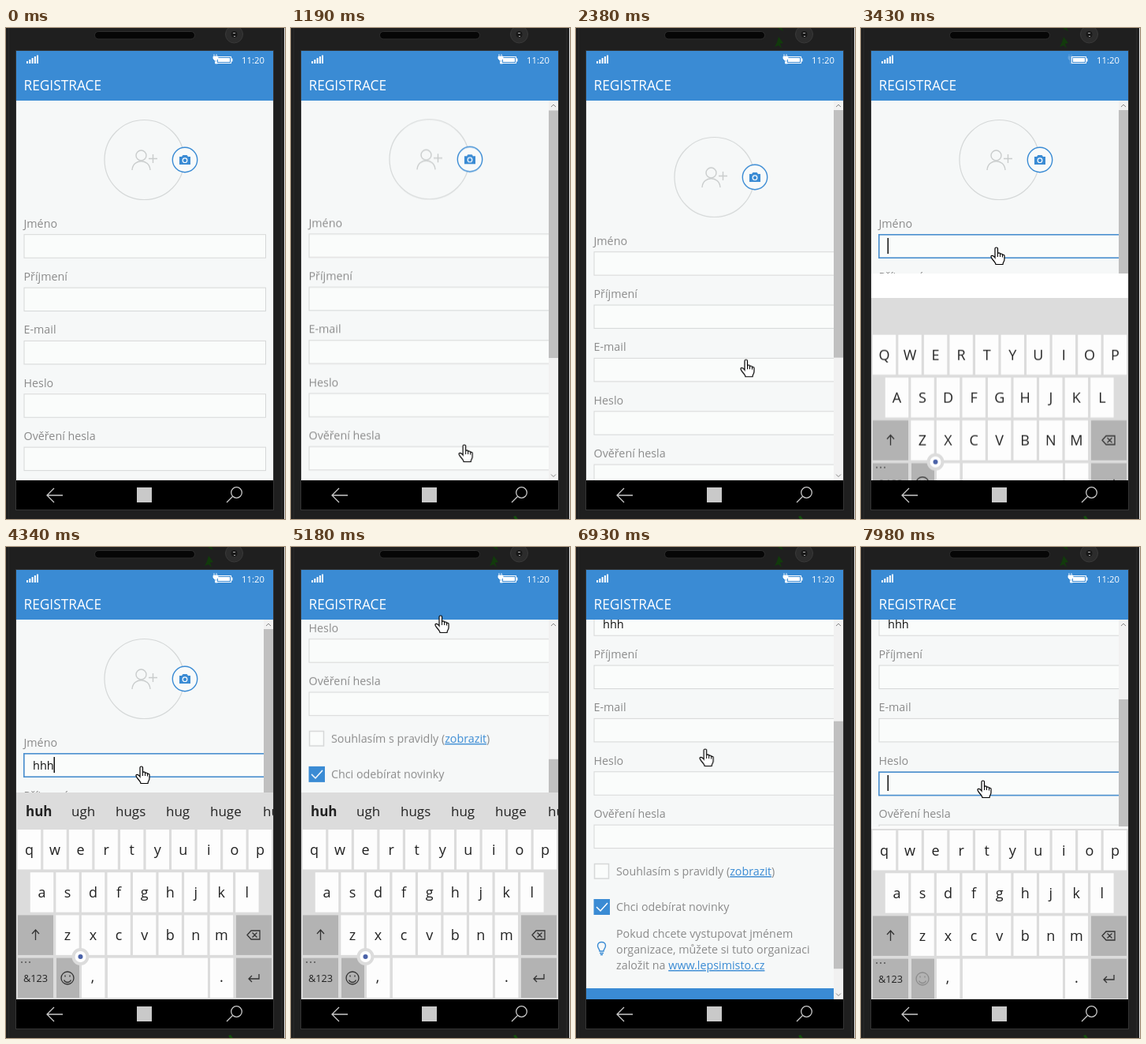
An HTML page that plays this animation: 354 by 622 pixels, repeating every 8 s.

```html
<!DOCTYPE html>
<html lang="cs">
<head>
<meta charset="utf-8">
<title>Registrace</title>
<style>
html, body { margin: 0; width: 100%; height: 100%; overflow: hidden; background: #1e1e1e; }
svg { position: absolute; left: 0; top: 0; display: block; }
text { font-family: "Open Sans", "Noto Sans", sans-serif; }
.stage { position: absolute; left: 0; top: 0; width: 354px; height: 622px; overflow: hidden; }
.view, .keyboard { position: absolute; left: 13px; width: 326px; overflow: hidden; }
.view { top: 92px; height: 481px; background: #f6f8f8; }
.keyboard { top: 311px; height: 262px; background: #fff; }
.page text { font-size: 14.3px; fill: #8b8b8b; }
.page .typed { font-size: 14.5px; fill: #111; }
.page .link { fill: #3a8bd4; text-decoration: underline; }
.field { fill: #fafcfb; stroke: #d6d8d8; }
.focus { fill: none; stroke: #4a90d0; stroke-width: 1.6; }
.line { fill: none; stroke: #3a8bd4; stroke-width: 1.4; }
.faint { fill: none; stroke: #d5d8d8; stroke-width: 1.2; }
.glyph { fill: none; stroke: #333; stroke-width: 1.3; }
.key { font-size: 18px; fill: #222; text-anchor: middle; }
.word { font-size: 17px; fill: #222; }
</style>
</head>
<body>
<div class="stage">
  <svg width="354" height="622">
    <rect width="354" height="622" fill="#1f1f1f"/>
    <path d="M3.5 0V622M349.5 0V622" stroke="#292929"/>
    <path d="M353.5 0V622" stroke="#e8e8e8"/>
    <rect x="112.5" y="4.5" width="127" height="9.5" rx="4.7" fill="#060606" stroke="#2e2e2e"/>
    <circle cx="289.500" cy="8" r="11" fill="#2c2c2c" stroke="#393939"/>
    <circle cx="289.500" cy="8" r="4" fill="#191919"/>
    <path d="M288 6.500h3M289 10.500h2" stroke="#aaa"/>
    <rect x="12.500" y="28.500" width="327" height="582" fill="#000" stroke="#343434"/>
    <rect x="13" y="29" width="326" height="63" fill="#3a8bd4"/>
    <path d="M27 45v-3M30.300 45v-5M33.600 45v-7M36.900 45v-9M40 45v-10.500" stroke="#fff" stroke-width="2"/>
    <rect x="267.500" y="36.500" width="18" height="8" fill="none" stroke="#fff"/>
    <path d="M269 38h15v5h-15zM286 38.500h1.500v4H286z" fill="#fff"/>
    <path class="plug" d="M264 33v3M267 33v3M263 36h6v3l-2 2h-2l-2-2zM265.500 41v4h3" fill="#fff" stroke="#fff" stroke-width=".8"/>
    <text x="299" y="44.500" font-size="11.300" fill="#fff">11:20</text>
    <text x="22.500" y="79" font-size="17.300" fill="#fff">REGISTRACE</text>
    <g fill="none" stroke="#c9c9c9" stroke-width="1.300">
      <path d="M72 592H53M61 583l-9 9 9 9"/>
      <circle cx="292.500" cy="588.500" r="6.800"/><path d="M287.500 593.500L280 601"/>
    </g>
    <rect x="166" y="582" width="19" height="19" fill="#c9c9c9"/>
    <path class="smudge" d="M282 619l3-1 3 4h-4z" fill="#14500c"/>
    <path class="residue" d="M256 0h5l2 4-4-2zM257 11l6 8-4 1 2 6-4-4-5 2 3-6z" fill="#123a0c"/>
    <path class="spark" d="M252 0h3M258 0l5 2M261 3h2" stroke="#20e020" stroke-width="1.500"/>
  </svg>

  <div class="view">
    <svg class="page" width="326" height="701" viewBox="13 92 326 701">
      <circle class="faint" cx="175.500" cy="167" r="50.500"/>
      <g class="faint" style="stroke:#c9cccc;stroke-width:1.400">
        <circle cx="171.500" cy="161.500" r="6.500"/><path d="M160 180c1-15 22-15 23 0M181 165.500h11M186.500 160v11"/>
      </g>
      <circle cx="227" cy="167" r="15.700" fill="#f8fafa" class="line" style="fill:#f8fafa"/>
      <path d="M220 163h3l1.500-2h5l1.500 2h3v10h-14z" fill="#3a8bd4"/>
      <circle cx="227" cy="167.700" r="2.800" fill="#3a8bd4" stroke="#fff" stroke-width="1.200"/>
      <g id="fields"></g>
      <g class="focusName">
        <rect class="focus" x="22.800" y="261.800" width="307" height="29.400"/>
        <rect class="caret" x="33.500" y="266" width="1.500" height="20" fill="#111"/>
      </g>
      <text class="typed" x="34" y="282"><tspan class="h1">h</tspan><tspan class="h2">h</tspan><tspan class="h3">h</tspan></text>
      <g class="focusPass">
        <rect class="focus" x="22.800" y="464.200" width="307" height="29.400"/>
        <rect x="33.500" y="468" width="1.500" height="20" fill="#111"/>
      </g>
      <rect class="field" x="23.500" y="580.500" width="18" height="18.500" style="stroke-width:1.500"/>
      <text x="51" y="595">Souhlasím s pravidly (<tspan class="link">zobrazit</tspan>)</text>
      <rect x="22.500" y="625" width="20.500" height="20" fill="#3a8bd4"/>
      <path d="M26 635l5 5 9-10" fill="none" stroke="#fff" stroke-width="1.500"/>
      <text x="51" y="640">Chci odebírat novinky</text>
      <path class="line" d="M30 691c0-3-2.500-3.500-2.500-7 0-6 10-6 10 0 0 3.500-2.500 4-2.500 7zM30 693.500h5M31 695.500h3"/>
      <text x="51" y="674">Pokud chcete vystupovat jménem</text>
      <text x="51" y="694">organizace, můžete si tuto organizaci</text>
      <text x="51" y="714">založit na <tspan class="link">www.lepsimisto.cz</tspan></text>
      <rect x="13" y="738" width="326" height="55" fill="#3a8bd4"/>
      <text x="176" y="771.500" text-anchor="middle" style="fill:#fff">REGISTROVAT</text>
    </svg>
    <svg class="scrollbar" width="326" height="481" viewBox="13 92 326 481">
      <rect x="327" y="92" width="12" height="481" fill="#f1f1f1"/>
      <rect class="thumb" x="327" y="104" width="12" height="314" fill="#c0c0c0"/>
      <path d="M330 100l3-3 3 3M330 565.500l3 3 3-3" fill="none" stroke="#888"/>
    </svg>
  </div>

  <div class="keyboard">
    <svg class="keys" width="326" height="262" viewBox="13 311 326 262">
      <rect x="13" y="311" width="326" height="262" fill="#dcdcdc"/>
      <rect class="passBand" x="13" y="352" width="326" height="4" fill="#fafafa"/>
      <g class="words word">
        <text x="25" y="341" font-weight="700">huh</text><text x="83" y="341">ugh</text>
        <text x="139" y="341">hugs</text><text x="203" y="341">hug</text><text x="259" y="341">huge</text>
        <text class="moreWords" x="326" y="341">huhs</text>
      </g>
      <g id="caps"></g>
      <g class="upper key" id="upper"></g>
      <g class="lower key" id="lower"></g>
      <g class="glyph">
        <path d="M37.500 498v-13M33 490l4.500-5 4.500 5"/>
        <path d="M306 491.500l5-5.500h11v11h-11zM312.500 488.500l6 6M318.500 488.500l-6 6"/>
        <path d="M321 541v6h-13M312 543l-4 4 4 4"/>
        <g class="smiley"><circle cx="78" cy="546" r="8"/><path d="M73.500 548.500c2 4 7 4 9 0M75 542.500v2M81 542.500v2"/></g>
      </g>
      <path d="M19 526h2M24 526h2M29 526h2" stroke="#555" stroke-width="1.500"/>
      <text x="37.500" y="551" font-size="12.700" fill="#222" text-anchor="middle">&amp;123</text>
      <text class="key" x="110" y="551">,</text><text class="key" x="273.500" y="551">.</text>
      <g class="stick">
        <circle cx="94.500" cy="519" r="11" fill="#dcdcdc"/><circle cx="94.500" cy="519" r="7" fill="#fff"/>
        <circle cx="94.500" cy="519" r="3" fill="#4a62a8"/>
      </g>
    </svg>
  </div>

  <svg class="cursor" width="20" height="24" viewBox="-8 -1 20 24">
    <path d="M-2 1.500c0-2 3.500-2 3.500 0V8c0-1.500 3-1.500 3 0v1c0-1.500 3-1.300 3 .2v1c0-1.500 2.500-1.200 2.500.3V15c0 3-2 3.500-2 6.500H-1c0-3-6-7-6-10 0-2 3-1.500 5 1.500z" fill="#fff" stroke="#000" stroke-width="1.200"/>
    <path d="M1.500 8v4M4.500 9v3M7.500 10v2.500" stroke="#000"/>
  </svg>
</div>

<script>
const LOOP = 8000;
const byId = id => document.getElementById(id);
const rules = [];

function animate(name, frames, easing = 'linear') {
  const body = frames.map(([ms, css]) => `${ms / LOOP * 100}%{${css}}`).join('');
  rules.push(`@keyframes ${name}{${body}}`);
  return `${name} ${LOOP}ms ${easing} infinite`;
}
function apply(selector, ...animations) {
  rules.push(`${selector}{animation:${animations.join(',')}}`);
}
// Visible only inside the given [from, to] spans.
function visible(name, ...spans) {
  const frames = spans[0][0] > 0 ? [[0, 'opacity:0']] : [];
  for (const [from, to] of spans) {
    frames.push([from, 'opacity:1'], [to, `opacity:${to === LOOP ? 1 : 0}`]);
  }
  if (frames.at(-1)[0] < LOOP) frames.push([LOOP, 'opacity:0']);
  return animate(name, frames, 'step-end');
}

// Form fields
byId('fields').innerHTML = ['Jméno', 'Příjmení', 'E-mail', 'Heslo', 'Ověření hesla'].map((label, i) => {
  const y = i * 67.35;
  return `<text x="22.500" y="${252.500 + y}">${label}</text>
    <rect class="field" x="23" y="${261.700 + y}" width="306.500" height="29.500"/>`;
}).join('');

// Keyboard
const PITCH = 32.55;
const cap = (x, y, w, fill = '#fdfdfd') => `<rect x="${x}" y="${y}" width="${w}" height="50.500" fill="${fill}"/>`;
const GREY = '#b3b3b3';
let caps = '', letters = '';
[['qwertyuiop', 29.5], ['asdfghjkl', 45.5], ['zxcvbnm', 78]].forEach(([row, first], r) => {
  [...row].forEach((letter, i) => {
    const x = first + i * PITCH;
    caps += cap(x - 14.7, 358 + r * 54.2, 29.4);
    letters += `<text x="${x}" y="${389.5 + r * 54.2}">${letter}</text>`;
  });
});
for (const y of [466.4, 520.6]) caps += cap(15, y, 45, GREY) + cap(292, y, 45, GREY);
caps += cap(64, 520.6, 29, GREY) + cap(96, 520.6, 29.4) + cap(129, 520.6, 127) + cap(259, 520.6, 29.4);
byId('caps').innerHTML = caps;
byId('lower').innerHTML = letters;
byId('upper').innerHTML = letters.replace(/>([a-z])</g, (_, c) => `>${c.toUpperCase()}<`);

// Hard changes
const spans = {
  scrollbar: [700, LOOP], smudge: [490, LOOP], residue: [1470, LOOP], spark: [1470, 1820],
  focusName: [3360, 5880], focusPass: [7630, LOOP], passBand: [7630, LOOP],
  upper: [0, 3710], lower: [3710, LOOP], stick: [0, 7000],
  h1: [3710, LOOP], h2: [3990, LOOP], h3: [4130, LOOP],
  words: [3990, 7000], moreWords: [4340, 7000]
};
for (const [name, span] of Object.entries(spans)) apply('.' + name, visible(name, span));
rules.push('.h1,.h2,.h3{animation:none}');
for (const name of ['h1', 'h2', 'h3']) {
  const on = spans[name][0];
  apply(`.page .${name}`, animate(name + 'Ink', [[0, 'fill:transparent'], [on, 'fill:#111'], [LOOP, 'fill:#111']], 'step-end'));
}
const shiftX = x => `transform:translateX(${x}px)`;
apply('.caret', animate('caret', [[0, shiftX(0)], [3710, shiftX(9)], [3990, shiftX(18)], [4130, shiftX(27)], [LOOP, shiftX(27)]], 'step-end'));
apply('.smiley', animate('smiley', [[0, 'opacity:1'], [7000, 'opacity:.3'], [LOOP, 'opacity:.3']], 'step-end'));

apply('.plug', animate('plug', [
  [0, 1], [70, 1], [210, .2], [420, .2], [560, 1], [2450, 1], [2660, .2], [3990, .2],
  [4200, 1], [5460, 1], [5740, 0], [6440, 0], [6720, 1], [LOOP, 1]
].map(([ms, o]) => [ms, `opacity:${o}`])));

// Scrolling
const shiftY = y => `transform:translateY(${y}px)`;
apply('.page', animate('scroll', [
  [0, 0], [1190, 0], [1540, 250], [1820, 220], [1960, 220], [2380, -22], [2730, 0],
  [4550, 0], [5180, 347], [5320, 372], [5390, 372], [5950, 210], [6300, 179], [LOOP, 179]
].map(([ms, y]) => [ms, shiftY(-y)])));

const VIEW = 481, TRACK = 457, FORM = 701, TALL = FORM + 262, PASS = FORM + 218;
const thumb = (offset, total) => `y:${104 + offset / total * TRACK}px;height:${VIEW / total * TRACK}px`;
apply('.thumb', animate('thumb', [
  [0, 0, FORM], [1190, 0, FORM], [1498, 220, FORM], [1960, 220, FORM], [2342, 0, FORM],
  [3430, 0, FORM], [3500, 0, TALL], [4550, 0, TALL], [5180, 347, TALL], [5320, 372, TALL],
  [5390, 372, TALL], [5880, 230, TALL], [5881, 220, FORM], [5950, 210, FORM], [6300, 179, FORM],
  [7630, 179, FORM], [7700, 179, PASS], [LOOP, 179, PASS]
].map(([ms, offset, total]) => [ms, thumb(offset, total)])));

// Keyboard sliding in and closing
apply('.keyboard', visible('keyboardOn', [3360, 6230], [7630, LOOP]), animate('keyboardClip', [
  [0, 0, 0], [5880, 0, 0], [5950, 17, 15], [6160, 40, 15], [6230, 60, 15], [6231, 43, 0], [LOOP, 43, 0]
].map(([ms, top, bottom]) => [ms, `clip-path:inset(${top}px 0 ${bottom}px 0)`])));
apply('.keys', animate('keysMove', [
  [0, 110], [3360, 110], [3430, 31], [3500, 8], [3570, 0], [5880, 0], [5950, -16], [6230, -16],
  [6231, 150], [7630, 150], [7700, 60], [7770, 20], [7840, 5], [7910, 1], [LOOP, 1]
].map(([ms, y]) => [ms, shiftY(y)])));

// Pointer, placed by its fingertip
apply('.cursor', animate('pointer', [
  [0, 286, 640], [70, 284, 616], [560, 281, 545], [700, 281, 545], [980, 220, 530], [1190, 220, 530],
  [1470, 258, -25], [1680, 258, -25], [1820, 240, 110], [1960, 235, 140], [2380, 216, 420],
  [2730, 215, 495], [2800, 215, 495], [3220, 172, 278], [4550, 172, 278], [5180, 190, 87],
  [5320, 191, 76], [5390, 191, 78], [5950, 183, 176], [6160, 182, 196], [6440, 182, 196],
  [7210, 154, 290], [7280, 155, 296], [LOOP, 155, 296]
].map(([ms, x, y]) => [ms, `transform:translate(${x - 8}px,${y - 1}px)`])));

const sheet = document.createElement('style');
sheet.textContent = rules.join('\n');
document.head.append(sheet);
</script>
</body>
</html>
```
